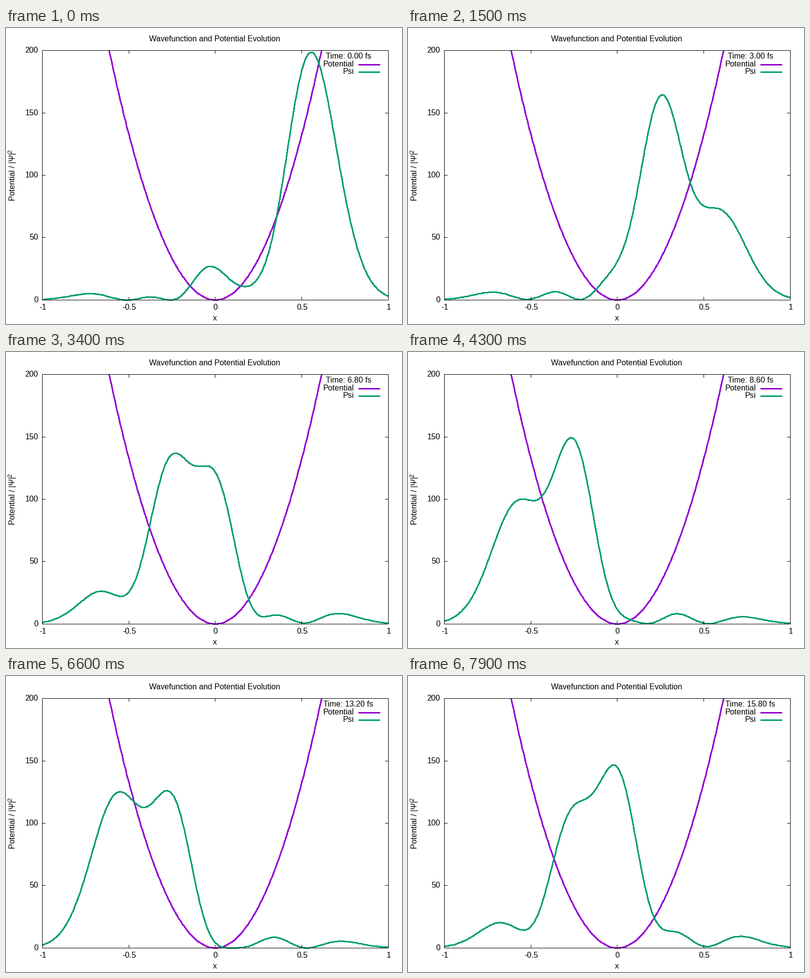
These frames come from a looping animation (800 px wide and 600 px high, 8000 ms). A matplotlib script:

```python
import numpy as np
import matplotlib.pyplot as plt
from matplotlib.animation import FuncAnimation
from matplotlib.patches import Rectangle

plt.rcParams["font.family"] = "Liberation Sans"

DPI = 100
PX = 72 / DPI                      # points per pixel
LEFT, RIGHT, TOP, BOTTOM = 73, 772, 45, 551
PURPLE, GREEN = "#9400D3", "#009E73"
# Aliased strokes fill every pixel they touch, so these cover 1 and 3 pixels
THIN, THICK = 0.5, 2

# Oscillator in atomic units: proton mass, 1500 cm^-1
MASS = 1836.15
OMEGA = 1500 / 219474.63
FS = 41.3414                       # atomic time units per femtosecond
STIFFNESS = 531
PSI_SCALE = 31.85
STATES = 5
FRAMES, STEP_FS = 80, 0.2


def px(x):
    return np.round(LEFT + (x + 1) / 2 * (RIGHT - LEFT))


def py(y):
    return np.round(BOTTOM - y / 200 * (BOTTOM - TOP))


def eigenstates(xi, count):
    """Hermite functions by recurrence, without the pi^(-1/4) factor."""
    phi = [np.exp(-xi**2 / 2)]
    phi.append(np.sqrt(2) * xi * phi[0])
    for n in range(2, count):
        phi.append(np.sqrt(2 / n) * xi * phi[-1] - np.sqrt((n - 1) / n) * phi[-2])
    return np.array(phi)


x = np.linspace(-1, 1, 201)
basis = eigenstates(x * np.sqrt(MASS * OMEGA), STATES)


def density(t):
    phase = np.exp(-1j * OMEGA * FS * t * np.arange(STATES))
    return PSI_SCALE * np.abs(phase @ basis) ** 2


fig = plt.figure(figsize=(800 / DPI, 600 / DPI), dpi=DPI, facecolor="white")
ax = fig.add_axes([0, 0, 1, 1])
ax.set(xlim=(-0.5, 799.5), ylim=(599.5, -0.5))
ax.axis("off")


def label(x, y, s, ha="center", size=16, **kw):
    return ax.text(x, y, s, ha=ha, va="baseline", fontsize=size * PX,
                   color="black", zorder=5, **kw)


def stroke(xs, ys, color="black", width=THIN, z=4):
    return ax.plot(xs, ys, color=color, lw=width * PX, zorder=z, antialiased=False,
                   snap=False, solid_capstyle="butt", solid_joinstyle="round")[0]


# Curves
potential = stroke(px(x), py(STIFFNESS * x**2), PURPLE, THICK, 2)
potential.set_clip_path(Rectangle((LEFT, TOP - 0.5), RIGHT - LEFT, BOTTOM - TOP + 3,
                                  transform=ax.transData))
psi = stroke(px(x), py(density(0)), GREEN, THICK, 3)

# Frame, tics and tic labels
stroke([LEFT, RIGHT, RIGHT, LEFT, LEFT], [TOP, TOP, BOTTOM, BOTTOM, TOP])
for v in (-1, -0.5, 0, 0.5, 1):
    p = px(v)
    stroke([p, p], [BOTTOM, BOTTOM - 6])
    stroke([p, p], [TOP, TOP + 6])
    label(p + 0.7, 570.5, f"{v:g}")
for v in range(0, 201, 50):
    p = py(v)
    stroke([LEFT, LEFT + 6], [p, p])
    stroke([RIGHT, RIGHT - 6], [p, p])
    label(64.5, p + 4.5, str(v), "right")

# Titles
label(421, 26.5, "Wavefunction and Potential Evolution")
label(421.5, 592.5, "x")
label(17.5, 349.5, "Potential / |Ψ|", "left", rotation=90, rotation_mode="anchor")
label(11.5, 253.5, "2", "left", 12.8, rotation=90, rotation_mode="anchor")

# Key
clock = label(691.3, 61.5, "")
for name, color, base, mid in (("Potential", PURPLE, 77.5, 74), ("Psi", GREEN, 92.5, 89)):
    label(703, base, name, "right")
    stroke([711.5, 755.5], [mid, mid], color, THICK)


def update(i):
    t = i * STEP_FS
    psi.set_ydata(py(density(t)))
    clock.set_text(f"Time: {t:.2f} fs")
    return psi, clock


anim = FuncAnimation(fig, update, frames=FRAMES, interval=100, repeat=True,
                     repeat_delay=0, blit=False)
plt.show()
```
